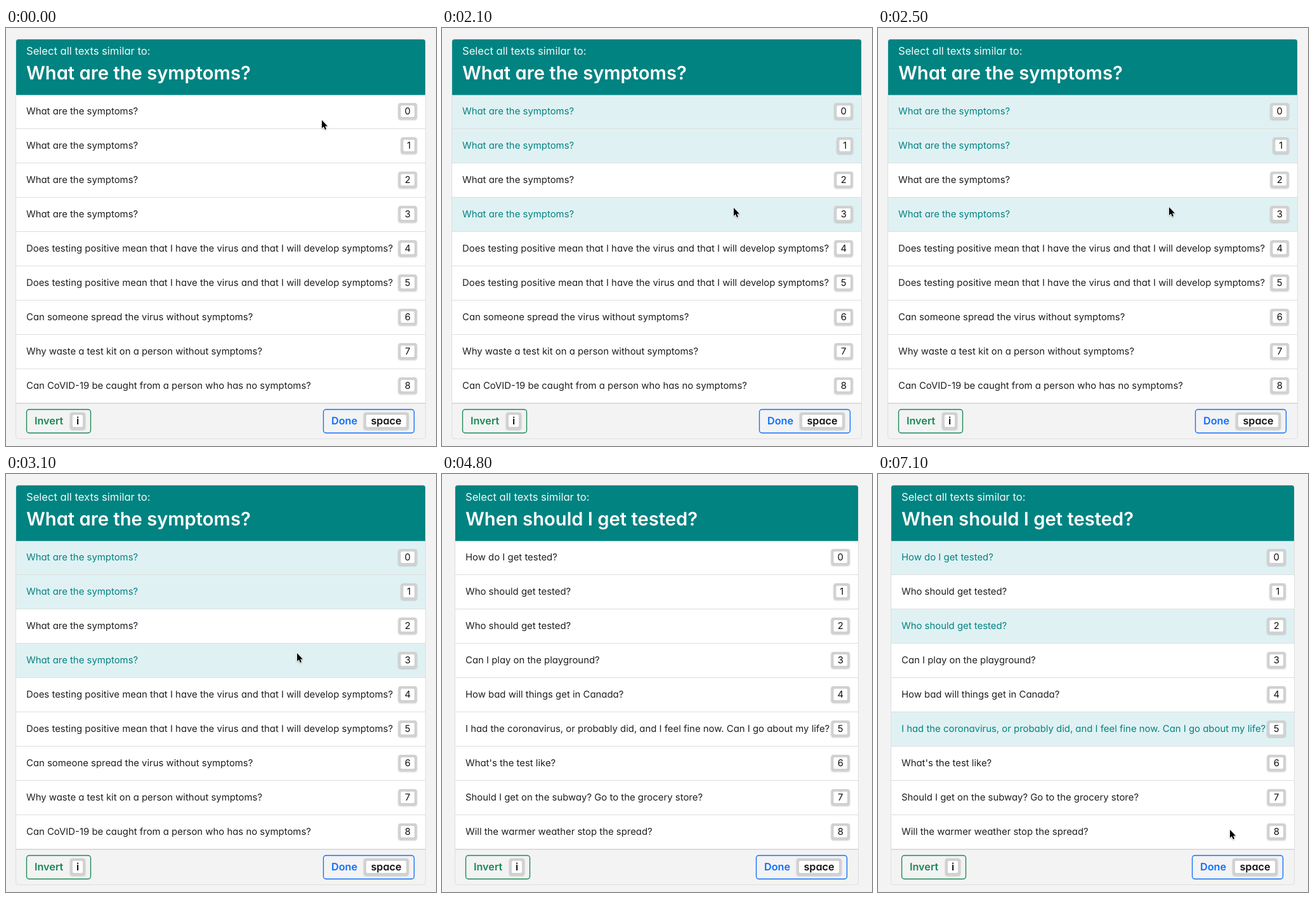
An HTML page for the animation above (7200 ms loop, 678 by 658 pixels).

```html
<!DOCTYPE html>
<html lang="en">
<head>
<meta charset="utf-8">
<title>Select similar texts</title>
<style>
  html, body { margin: 0; height: 100%; overflow: hidden; background: #f3f3f3; }
  svg { display: block; text-rendering: geometricPrecision; }
  text { font: 14.9px Inter, sans-serif; font-feature-settings: "cv11"; font-optical-sizing: none; fill: #1c1f22; }
  .lead { font-size: 16.6px; fill: #f2fafa; }
  .title { font-size: 29.2px; font-weight: 600; fill: #fff; }
  .selected rect.row { fill: #e0f1f3; }
  .selected text.label { fill: #008381; }
  .row { fill: #fff; }
  .line { stroke: #dedede; }
  .key text { text-anchor: middle; fill: #111; }
  .key { filter: drop-shadow(0 1px 1px #0003); }
  .button text { font-size: 16.2px; font-weight: 600; }
  .button > rect { fill: none; stroke: currentColor; stroke-width: 1.35; }
  .button > text { fill: currentColor; }
</style>
</head>
<body>
<svg id="stage" width="678" height="658" viewBox="0 0 678 658"></svg>
<script>
const LOOP = 7200, STEP = 100;

// picks: [row, time of the click]
const cards = [
  {
    from: 0, left: 16, right: 661, title: "What are the symptoms?",
    picks: [[0, 500], [1, 1000], [3, 1600]],
    rows: [
      "What are the symptoms?",
      "What are the symptoms?",
      "What are the symptoms?",
      "What are the symptoms?",
      "Does testing positive mean that I have the virus and that I will develop symptoms?",
      "Does testing positive mean that I have the virus and that I will develop symptoms?",
      "Can someone spread the virus without symptoms?",
      "Why waste a test kit on a person without symptoms?",
      "Can CoVID-19 be caught from a person who has no symptoms?"
    ]
  },
  {
    from: 4400, left: 21, right: 656, title: "When should I get tested?",
    picks: [[0, 5700], [2, 6200], [5, 6700]],
    rows: [
      "How do I get tested?",
      "Who should get tested?",
      "Who should get tested?",
      "Can I play on the playground?",
      "How bad will things get in Canada?",
      "I had the coronavirus, or probably did, and I feel fine now. Can I go about my life?",
      "What's the test like?",
      "Should I get on the subway? Go to the grocery store?",
      "Will the warmer weather stop the spread?"
    ]
  }
];

// Pointer stops: time, x, y
const stops = [
  [0, 498, 145], [500, 489, 142], [1000, 474, 190], [1600, 461, 281], [2100, 460, 283],
  [2500, 459, 282], [5100, 459, 282], [5600, 416, 145], [5800, 414, 154],
  [6200, 422, 238], [6700, 452, 400], [7100, 555, 560]
];
const hidden = [4400, 5100];

const text = (x, y, value, cls = "") => `<text class="${cls}" x="${x}" y="${y}">${value}</text>`;

const key = (x, y, w, h, label, baseline) => `<g class="key">
  <rect x="${x}" y="${y}" width="${w}" height="${h}" rx="4" fill="#d1d1d1"/>
  <rect x="${x + 4}" y="${y + 4}" width="${w - 8}" height="${h - 8}" rx="2" fill="#fff"/>
  ${text(x + w / 2, baseline, label)}</g>`;

const button = (x, w, color, label, shortcut, keyX, keyW) => `<g class="button" color="${color}">
  <rect x="${x}" y="600.5" width="${w}" height="37" rx="4"/>
  ${text(x + 12.5, 624, label)}${key(keyX, 605, keyW, 27, shortcut, 624)}</g>`;

function row(card, label, i) {
  const y = 105 + 54 * i, w = i === 1 ? 25.5 : 29.5;
  return `<g class="item"><rect class="row" x="${card.left}" y="${y}" width="${card.right - card.left}" height="54"/>
    <path class="line" d="M${card.left} ${y + 53.5}H${card.right}"/>
    ${text(card.left + 16, y + 31, label, "label")}
    ${key(card.right - 13 - w, y + 13, w, 26, i, y + 31)}</g>`;
}

function drawCard(card) {
  const { left, right, title, rows } = card, width = right - left;
  return `<g class="card">
    ${rows.map((label, i) => row(card, label, i)).join("")}
    <rect class="line" x="${left - 0.5}" y="17.5" width="${width + 1}" height="629" rx="4" fill="none"/>
    <path fill="#008381" d="M${left} 105.5V21.5q0-3.5 3.5-3.5H${right - 3.5}q3.5 0 3.5 3.5V105.5Z"/>
    ${text(left + 16, 42, "Select all texts similar to:", "lead")}
    ${text(left + 16, 81, title, "title")}
    <path stroke="#d3d3d3" stroke-width="1.5" d="M${left} 590.7H${right}"/>
    ${button(left + 16.5, 101, "#198754", "Invert", "i", left + 85, 24)}
    ${button(right - 160.5, 143, "#0d6efd", "Done", "space", right - 97, 71)}
  </g>`;
}

const stage = document.getElementById("stage");
stage.innerHTML = cards.map(drawCard).join("") + `<path id="pointer" fill="#000" stroke="#fff"
  stroke-linejoin="round" paint-order="stroke" stroke-width="1.4"
  style="filter:drop-shadow(0 1px 1px #0004)" d="M0 0V12.8L2.9 10.2L5 15L7 14.1L5 9.4H9Z"/>`;
const groups = [...stage.querySelectorAll(".card")];
const pointer = document.getElementById("pointer");

function pointerAt(t) {
  const next = stops.findIndex(stop => stop[0] > t);
  if (next < 0) return stops.at(-1).slice(1);
  const [t0, x0, y0] = stops[next - 1], [t1, x1, y1] = stops[next];
  const p = (t - t0) / (t1 - t0), ease = p * p * (3 - 2 * p);
  return [x0 + (x1 - x0) * ease, y0 + (y1 - y0) * ease];
}

function render(now) {
  const t = Math.floor(now % LOOP / STEP) * STEP;
  const current = t < cards[1].from ? 0 : 1;
  groups.forEach((group, i) => group.style.display = i === current ? "" : "none");
  const items = groups[current].querySelectorAll(".item");
  items.forEach((item, i) =>
    item.classList.toggle("selected", cards[current].picks.some(([r, at]) => r === i && t >= at)));
  pointer.style.display = t >= hidden[0] && t < hidden[1] ? "none" : "";
  pointer.setAttribute("transform", `translate(${pointerAt(t)})`);
}

const start = performance.now();
function tick() {
  render(performance.now() - start);
  requestAnimationFrame(tick);
}
tick();
</script>
</body>
</html>
```
